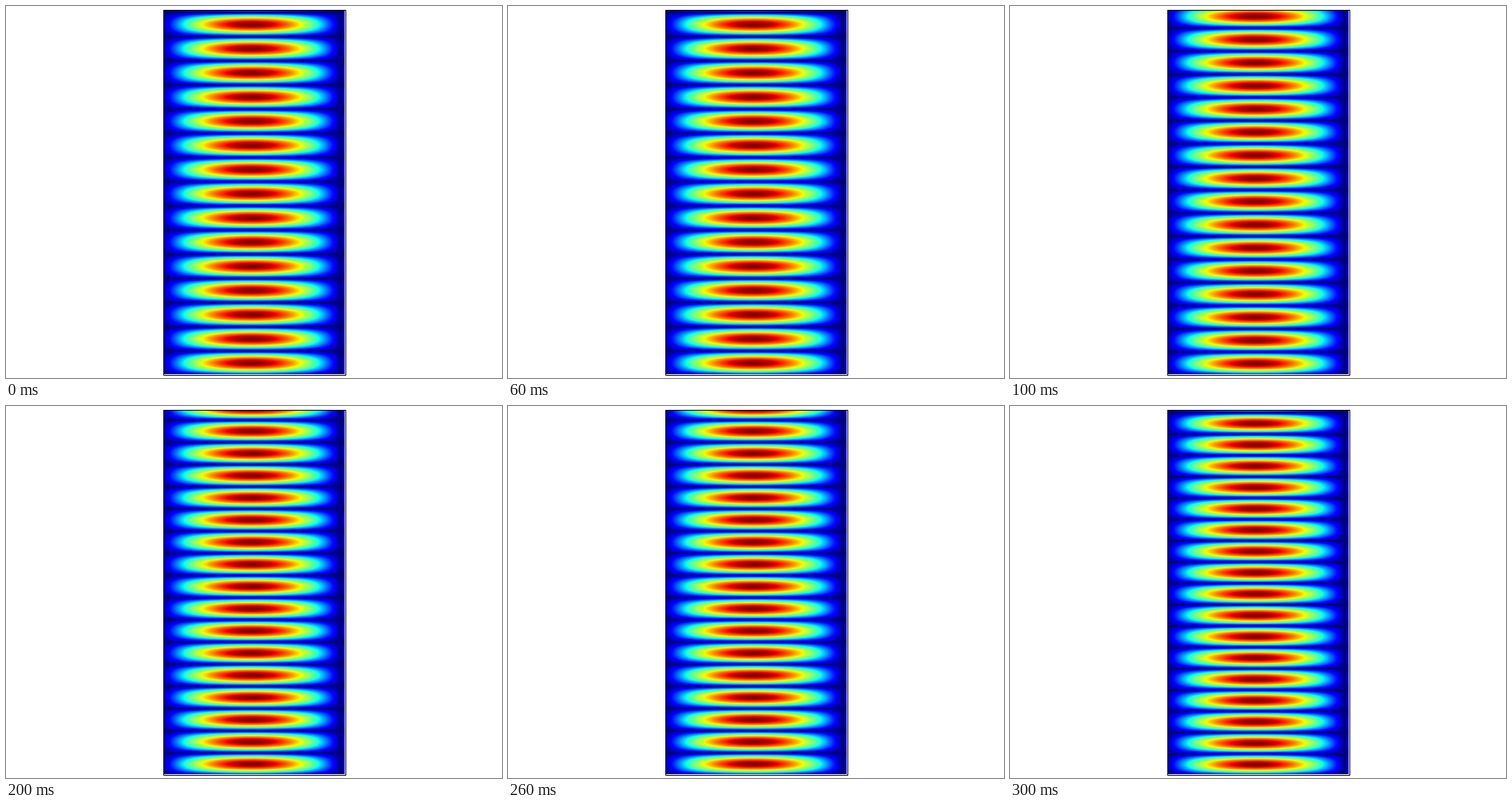
Write a matplotlib script that moves like this. It is 640 by 480 pixels and loops after 400 ms.

```python
import numpy as np
import matplotlib.pyplot as plt
from matplotlib.animation import FuncAnimation
from matplotlib.patches import Rectangle

W, H, DPI = 640, 480, 80
FRAMES, INTERVAL = 4, 100

# Inner field area in pixels, y measured downwards
LEFT, RIGHT, TOP, BOTTOM = 203, 437, 5, 475
X_ZERO, X_HALF = 201.5, 230.5      # first wall node and half wavelength across
Y_ZERO = 476.2                     # node at the feeding end
K0, DK = 1 / 31.2, 0.001437        # half waves per pixel, rise per frame

x = np.arange(LEFT, RIGHT) + 0.5
y = np.arange(TOP, BOTTOM) + 0.5
across = np.abs(np.sin(np.pi * (x - X_ZERO) / X_HALF))


def field(i):
    """Magnitude of the standing wave at frequency step i."""
    k = K0 + DK * (i % FRAMES)
    along = np.abs(np.sin(np.pi * k * (Y_ZERO - y)))
    return np.outer(along, across)


fig = plt.figure(figsize=(W / DPI, H / DPI), dpi=DPI, facecolor="white")
ax = fig.add_axes([0, 0, 1, 1])
ax.axis("off")

image = ax.imshow(field(0), cmap="jet", vmin=0, vmax=1,
                  interpolation="nearest", aspect="auto",
                  extent=(LEFT, RIGHT, BOTTOM, TOP))
ax.add_patch(Rectangle((LEFT - 0.5, TOP - 0.5),
                       RIGHT - LEFT + 1, BOTTOM - TOP + 1,
                       fill=False, edgecolor="black",
                       linewidth=72 / DPI, joinstyle="miter", zorder=3))
ax.set_xlim(0, W)
ax.set_ylim(H, 0)


def update(i):
    image.set_data(field(i))
    return (image,)


anim = FuncAnimation(fig, update, frames=FRAMES, interval=INTERVAL,
                     repeat=True, repeat_delay=0, blit=False)
plt.show()
```
